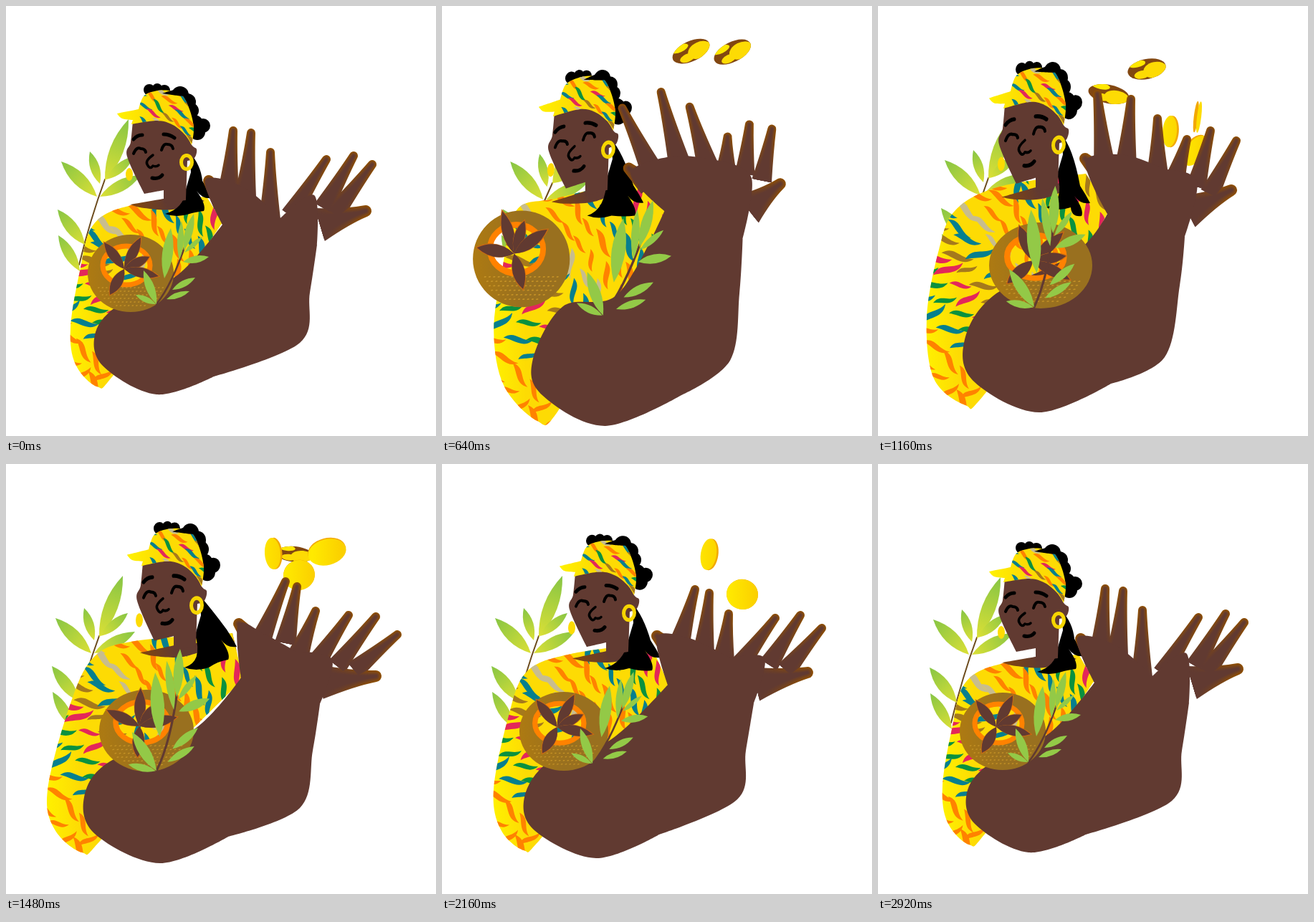
Animation of 600 by 600 pixels, one loop 3000 ms. Source, as an HTML page with a canvas:

```html
<!DOCTYPE html>
<html>
<head>
<meta charset="utf-8">
<style>
html, body { margin: 0; width: 100%; height: 100%; overflow: hidden; background: #fff }
canvas { display: block; width: 600px; height: 600px }
</style>
</head>
<body>
<canvas id="stage" width="600" height="600"></canvas>
<script>
const ctx = document.getElementById('stage').getContext('2d');
const SKIN = '#613a31', GOLD = '#fddb04', GREEN = '#93c947', OCHRE = '#99701f', ORANGE = '#ff8200';
const DYES = ['#067f8e', ORANGE, '#e3275a', '#c8bd8e', '#067f8e', '#a5791c', ORANGE, '#0a913f'];
const TIMES = [0, 400, 880, 1160, 1480, 2160, 2920];

// Poses at TIMES; the last pose repeats the first.
const head = [ // nose x, y, vertical shear, vertical scale
  [203, 222, 0, 1], [186, 216, -.1, 1.04], [185, 206, -.14, 1.08],
  [203, 203, -.1, 1.1], [217, 203, -.03, 1.08], [212, 214, -.04, 1.02]];
const tail = [ // left tip, right tip of the hair
  [222, 290, 288, 268], [207, 296, 292, 280], [205, 287, 273, 268],
  [235, 281, 296, 275], [249, 284, 322, 255], [227, 285, 305, 270]];
const backTwig = [ // x, y, turn
  [130, 266, 0], [135, 275, .1], [152, 264, .04], [146, 264, 0], [122, 264, 0], [127, 264, 0]];
const frontTwig = [ // x, y, turn, scale
  [210, 416, 0, 1], [222, 433, .04, 1.24], [225, 427, -.04, 1.29],
  [218, 420, -.22, 1.26], [210, 428, -.2, 1.27], [210, 418, .03, 1.03]];
const dress = [
  [175, 278, 280, 266, 302, 302, 250, 380, 150, 515, 127, 531, 97, 500, 90, 450, 103, 370, 122, 305],
  [165, 275, 264, 249, 312, 295, 240, 440, 160, 560, 131, 573, 88, 525, 74, 460, 88, 390, 112, 290],
  [160, 260, 270, 238, 312, 280, 250, 400, 158, 565, 132, 576, 85, 530, 72, 445, 82, 345, 98, 283],
  [170, 252, 290, 234, 323, 284, 260, 400, 146, 545, 122, 557, 78, 520, 68, 435, 85, 340, 108, 285],
  [180, 247, 316, 236, 331, 300, 255, 375, 132, 525, 106, 542, 68, 510, 58, 455, 88, 340, 122, 270],
  [180, 265, 290, 250, 317, 308, 240, 400, 136, 525, 114, 539, 82, 510, 72, 455, 92, 355, 118, 290]];
const hands = [ // palm edge from left to right, then down the forearm
  [278, 243, 330, 252, 383, 296, 430, 264, 434, 333, 424, 400, 410, 470],
  [270, 240, 330, 214, 385, 230, 435, 250, 421, 332, 416, 400, 405, 490],
  [262, 225, 320, 210, 385, 212, 430, 232, 421, 318, 416, 400, 400, 495],
  [290, 217, 345, 208, 400, 228, 445, 244, 428, 322, 421, 390, 400, 490],
  [324, 224, 362, 238, 405, 262, 455, 273, 438, 335, 428, 400, 410, 480],
  [300, 242, 345, 243, 403, 271, 450, 271, 435, 334, 424, 400, 412, 468]];
const elbow = [ // below the forearm and round to the left wrist
  [290, 517, 210, 542, 135, 502, 125, 455, 160, 415, 240, 375, 302, 305],
  [330, 542, 225, 582, 140, 540, 125, 490, 170, 413, 240, 414, 311, 290],
  [335, 537, 228, 582, 140, 540, 127, 490, 165, 423, 255, 378, 310, 285],
  [325, 527, 225, 567, 135, 525, 120, 470, 160, 405, 275, 345, 320, 290],
  [310, 520, 215, 557, 125, 517, 109, 465, 145, 415, 260, 372, 328, 298],
  [303, 517, 215, 550, 130, 512, 115, 465, 150, 415, 235, 385, 315, 308]];
const tips = [
  [283, 244, 317, 174, 342, 177, 369, 204, 447, 214, 485, 209, 511, 221, 502, 286],
  [267, 231, 277, 143, 315, 135, 355, 156, 415, 190, 447, 178, 474, 188, 481, 264],
  [261, 222, 241, 143, 307, 113, 345, 135, 392, 179, 422, 159, 458, 163, 469, 238],
  [289, 213, 306, 123, 353, 130, 390, 157, 431, 186, 464, 174, 500, 188, 493, 257],
  [325, 223, 390, 164, 406, 171, 432, 205, 478, 211, 516, 213, 546, 238, 516, 296],
  [300, 240, 353, 175, 373, 180, 400, 209, 465, 215, 500, 211, 530, 229, 510, 291]];
const roots = [
  [303, 275, 310, 262, 334, 264, 368, 297, 397, 292, 443, 282, 458, 290, 438, 305],
  [292, 255, 300, 230, 340, 222, 373, 236, 402, 242, 432, 248, 453, 257, 430, 294],
  [290, 248, 286, 222, 323, 216, 370, 218, 393, 224, 418, 230, 443, 238, 426, 276],
  [316, 240, 316, 222, 346, 222, 390, 234, 415, 240, 444, 252, 463, 262, 432, 287],
  [347, 250, 354, 250, 390, 250, 408, 266, 434, 276, 462, 282, 486, 288, 440, 304],
  [322, 262, 331, 252, 365, 262, 393, 272, 416, 280, 456, 280, 480, 288, 438, 307]];
const bowl = { // centre, radii, turn
  times: [0, 400, 560, 880, 1160, 1480, 2160, 2920],
  rows: [[174, 373, 60, 54, 0], [97, 352, 62, 68, -.5], [84, 349, 65, 68, -.7], [210, 367, 75, 65, -.85],
    [227, 362, 72, 60, .3], [196, 372, 66, 57, -.45], [170, 373, 62, 55, 0], [174, 373, 60, 54, 0]]
};
// Tossed pieces: time, x, y, long radius, short radius, turn
const nuts = [
  [[280, 440, 230, 27, 14, .6], [400, 404, 117, 29, 13, .1], [620, 352, 62, 28, 14, -.4], [880, 297, 133, 26, 15, -.8], [1000, 290, 240, 26, 15, -1]],
  [[280, 440, 270, 26, 13, -1.2], [400, 431, 176, 28, 13, -.85], [680, 400, 54, 28, 14, -.4], [880, 366, 77, 30, 14, -.1], [1160, 322, 123, 29, 13, .2], [1300, 335, 250, 26, 13, .5]],
  [[720, 420, 240, 26, 14, -1.3], [880, 405, 109, 28, 16, -.85], [1160, 375, 88, 27, 14, -.2], [1480, 403, 126, 26, 11, .1], [1640, 380, 260, 24, 12, .6]]];
const coins = [
  [[1040, 410, 250, 22, 12, 1.5], [1160, 407, 175, 22, 10, 1.65], [1320, 390, 104, 22, 16, 1.6], [1480, 372, 125, 22, 11, 1.5], [1660, 365, 260, 22, 14, 1.2]],
  [[1060, 440, 270, 24, 10, -.9], [1160, 443, 202, 24, 13, -.95], [1320, 430, 120, 23, 18, -.6], [1480, 409, 155, 22, 21, -.3], [1620, 395, 270, 22, 18, 0]],
  [[1060, 450, 260, 22, 3, -1.5], [1160, 448, 155, 22, 3, -1.45], [1320, 455, 92, 24, 10, -.8], [1480, 448, 123, 27, 18, -.25], [1680, 415, 270, 22, 20, 0]],
  [[1900, 405, 270, 22, 18, 1.2], [2160, 372, 126, 22, 11, 1.72], [2400, 345, 260, 22, 18, 2]],
  [[2020, 430, 280, 22, 12, .2], [2160, 419, 182, 22, 21, .2], [2300, 400, 132, 22, 16, .5], [2520, 365, 280, 22, 10, 1]]];

function sample(times, rows, t) {
  const last = times.length - 1;
  let i = 0;
  while (i < last - 1 && t >= times[i + 1]) i++;
  const h = times[i + 1] - times[i], u = (t - times[i]) / h, v = 1 - u;
  const slope = (j, k) => j > 0 && j < last
    ? (rows[j + 1][k] - rows[j - 1][k]) / (times[j + 1] - times[j - 1]) : 0;
  return rows[i].map((a, k) => v * v * (1 + 2 * u) * a + u * u * (3 - 2 * u) * rows[i + 1][k]
    + h * u * v * (v * slope(i, k) - u * slope(i + 1, k)));
}
const pose = (rows, t) => sample(TIMES, [...rows, rows[0]], t);

function shape(p, corners = []) {
  const n = p.length / 2, at = i => [p[(i + n) % n * 2], p[(i + n) % n * 2 + 1]];
  const pull = i => {
    if (corners.includes(i % n)) return [0, 0];
    const a = at(i - 1), b = at(i + 1);
    return [(b[0] - a[0]) / 6, (b[1] - a[1]) / 6];
  };
  ctx.beginPath();
  ctx.moveTo(...at(0));
  for (let i = 0; i < n; i++) {
    const a = at(i), b = at(i + 1), c = pull(i), d = pull(i + 1);
    ctx.bezierCurveTo(a[0] + c[0], a[1] + c[1], b[0] - d[0], b[1] - d[1], ...b);
  }
  ctx.closePath();
}
function fill(color) { ctx.fillStyle = color; ctx.fill(); }
function oval(x, y, rx, ry, color, turn = 0) {
  ctx.beginPath();
  ctx.ellipse(x, y, rx, ry, turn, 0, 7);
  fill(color);
}
function group(x, y, turn, scale, draw) {
  ctx.save();
  ctx.translate(x, y);
  ctx.rotate(turn);
  ctx.scale(scale, scale);
  draw();
  ctx.restore();
}
function line(d, width, color = '#000') {
  ctx.lineWidth = width;
  ctx.lineCap = ctx.lineJoin = 'round';
  ctx.strokeStyle = color;
  ctx.stroke(new Path2D(d));
}
function blend(x0, y0, x1, y1, from, to) {
  const g = ctx.createLinearGradient(x0, y0, x1, y1);
  g.addColorStop(0, from);
  g.addColorStop(1, to);
  return g;
}
function leaf(x0, y0, x1, y1, w, color) {
  const l = Math.hypot(x1 - x0, y1 - y0), nx = (y0 - y1) / l * w, ny = (x1 - x0) / l * w;
  const mx = (x0 + x1) / 2, my = (y0 + y1) / 2;
  ctx.beginPath();
  ctx.moveTo(x0, y0);
  ctx.quadraticCurveTo(mx + nx, my + ny, x1, y1);
  ctx.quadraticCurveTo(mx - nx, my - ny, x0, y0);
  fill(color);
}

const flame = new Path2D('M-21 2C-8-13 3 1 21-5C10 10-4 1-21 2Z');
function flames(x0, y0, x1, y1, step, size, place) {
  let seed = 7, n = 0;
  const rnd = () => (seed = seed * 16807 % 2147483647) / 2147483647;
  for (let y = y0, row = 0; y < y1; y += step * .53, row++)
    for (let x = x0 + row % 2 * step / 2; x < x1; x += step) {
      const px = x + rnd() * 8 - 4, py = y + rnd() * 6 - 3, a = rnd(), s = size * (.75 + rnd() * .4);
      const color = DYES[(n++ * 3 + row * 2) % DYES.length];
      group(...place(px, py, a), s, () => { ctx.fillStyle = color; ctx.fill(flame); });
    }
}

function drawBackTwig([x, y, turn]) {
  group(x, y, turn, 1, () => {
    line('M8-24Q-12 30-28 95', 2, '#6b4a1c');
    for (const [a, b, c, d, w] of [[8, -22, 41, -108, 19], [-3, 0, -53, -49, 18], [1, -18, -13, -63, 13],
      [1, 0, 58, -30, 16], [10, -24, 48, -56, 13], [-20, 67, -58, 18, 17], [-27, 104, -57, 54, 15]])
      leaf(a, b, c, d, w, blend(a, b, c, d, '#dce035', '#86c545'));
  });
}
function drawFrontTwig([x, y, turn, scale]) {
  group(x, y, turn, scale, () => {
    line('M0 0Q22-28 41-85', 2.5, SKIN);
    for (const l of [[0, 0, -18, -47, 12], [-1, 0, -29, -13, 8], [11, -36, 20, -106, 15], [38, -75, 52, -126, 11],
      [32, -62, 35, -116, 9], [37, -59, 73, -66, 10], [39, -72, 64, -94, 7], [22, -20, 54, -37, 9], [14, -7, 46, -18, 8]])
      leaf(...l, GREEN);
  });
}

function drawDress(p) {
  ctx.save();
  shape(p, [1, 2, 3]);
  fill(blend(p[14], 0, p[14] + 45, 0, '#fff000', GOLD));
  ctx.clip();
  const base = dress[0], shift = (i, v) => (p[18 + i] - base[18 + i]) * (1 - v) + (p[10 + i] - base[10 + i]) * v;
  flames(40, 235, 345, 560, 33, .95, (x, y, a) => {
    const v = Math.min(1, Math.max(0, (y - 290) / 240));
    return [x + shift(0, v), y + shift(1, v), x > 190 ? 1.1 + a * .7 : y < 350 ? .3 + a * .6 : y > 460 ? a * 2 - .6 : a * .9 - .5];
  });
  ctx.restore();
}

function drawHead([x, y, shear, sy], [lx, ly, rx, ry]) {
  const inHead = draw => {
    ctx.save();
    ctx.transform(1, shear, 0, sy, x, y);
    draw();
    ctx.restore();
  };
  inHead(() => {
    shape([-30, 55, 17, 47, 60, 44, 74, 50, 30, 62, -10, 60], [0, 1, 2, 3]);
    fill(blend(-25, 60, 20, 48, '#82460f', SKIN));
    oval(-31, 13, 5, 9, GOLD);
  });
  // Two locks with a thin gap near the neck.
  const ex = x + 57, ey = y + shear * 57 - 18;
  ctx.beginPath();
  ctx.moveTo(ex - 4, ey);
  ctx.quadraticCurveTo(ex + 12, ey + 18, rx - 14, ry - 24);
  ctx.quadraticCurveTo(rx - 6, ry - 12, rx, ry);
  ctx.quadraticCurveTo(rx - 14, ry + 2, rx - 22, ry - 10);
  ctx.quadraticCurveTo(rx - 8, ry + 10, rx - 12, ry + 18);
  ctx.quadraticCurveTo(rx - 26, ry + 20, lx + 34, ly);
  ctx.quadraticCurveTo(lx + 16, ly + 6, lx, ly);
  ctx.quadraticCurveTo(lx + 26, ly - 8, ex - 10, ey + 55);
  ctx.lineTo(ex - 2, ey + 28);
  fill('#000');
  inHead(() => {
    for (const [a, b, r] of [[-3, -105, 8], [8, -107, 7], [18, -104, 8], [40, -98, 12], [50, -88, 12], [55, -76, 11],
      [60, -58, 12], [72, -55, 10], [64, -46, 11]]) oval(a, b, r, r, '#000');
    shape([-26, -62, -29, -32, -34, -12, -10, 40, 17, 35, 17, 53, 48, 49, 50, -6, 60, -10, 63, -22, 55, -30, 40, -66],
      [0, 3, 4, 5, 6, 7]);
    fill(SKIN);
    // Headwrap with its knot on the left.
    ctx.save();
    shape([-48, -72, -18, -78, -11, -96, 4, -103, 24, -104, 42, -98, 53, -78, 59, -52, 56, -28, 47, -42, 30, -56, 8, -62,
      -28, -57, -26, -63, -41, -65], [0, 1, 8, 12, 13]);
    fill(blend(-45, 0, 0, 0, '#fff000', GOLD));
    ctx.clip();
    flames(-12, -104, 66, -24, 22, .62, (a, b, r) => [a, b, .5 + r * .6]);
    ctx.restore();
    shape([15, -100, 35, -105, 48, -96, 36, -97], [0, 2]);
    fill('#000');
    line('M-25-36Q-20-42-13-42M17-43Q25-43 32-38', 5);
    line('M-25-16Q-21-26-15-23Q-9-23-8-18M14-21Q17-31 22-29Q29-29 30-23', 4);
    line('M2-14Q-9-6-6-1Q-2 7 2 1Q7 3 10 0', 3.5);
    line('M1 18Q10 20 15 14', 5);
    ctx.beginPath();
    ctx.ellipse(49, -4, 7.5, 9.5, 0, 0, 7);
    ctx.lineWidth = 5;
    ctx.strokeStyle = '#f6d600';
    ctx.stroke();
  });
}

function drawTossed(rows, t, isNut) {
  const times = rows.map(r => r[0]);
  if (t < times[0] || t > times[times.length - 1]) return;
  const [, x, y, rx, ry, turn] = sample(times, rows, t);
  if (isNut) {
    group(x, y, turn, 1, () => {
      oval(0, 0, rx, ry, '#824711');
      ctx.clip();
      oval(rx * .42, ry * .25, rx * .62, ry * .8, GOLD);
      oval(-rx * .3, ry * .45, rx * .4, ry * .4, GOLD);
      oval(-rx * .45, -ry * .7, rx * .45, ry * .35, '#ffe800');
    });
  } else {
    const rim = 5 * (1 - ry / rx);
    oval(x + rim * Math.sin(turn), y - rim * Math.cos(turn), rx, ry, '#f2a800', turn);
    oval(x, y, rx, ry, blend(x - 20, y, x + 20, y, '#ffea00', '#fbd000'), turn);
  }
}

function drawArm(palm, bend, ends, starts) {
  const edge = [142, 78, 4], core = [97, 58, 49], layers = 6;
  for (let k = 0; k < layers; k++) {
    const f = k / (layers - 1), color = `rgb(${edge.map((c, i) => c + (core[i] - c) * f)})`;
    for (let i = 0; i < 16; i += 2) {
      const thumb = i == 0 || i == 14, wide = (i == 14 ? 24 : i > 6 && i < 14 ? 14 : 15) * (1 - f * .35);
      const r = (thumb ? 8 : 6) * (1 - f * .75);
      const [x, y, bx, by] = [ends[i], ends[i + 1], starts[i], starts[i + 1]];
      const a = Math.atan2(y - by, x - bx), nx = -Math.sin(a), ny = Math.cos(a);
      const mx = (x * .6 + bx * .4), my = (y * .6 + by * .4), m = r * 1.35;
      ctx.beginPath();
      ctx.moveTo(bx + nx * wide, by + ny * wide);
      ctx.quadraticCurveTo(mx + nx * m, my + ny * m, x + nx * r, y + ny * r);
      ctx.arc(x, y, r, a + Math.PI / 2, a - Math.PI / 2, true);
      ctx.quadraticCurveTo(mx - nx * m, my - ny * m, bx - nx * wide, by - ny * wide);
      fill(blend(x, y, bx, by, color, SKIN));
    }
  }
  shape([...palm, ...bend], [2, 4, 7, 13]);
  fill(SKIN);
}

function drawBowl([x, y, rx, ry, turn]) {
  group(x, y, 0, 1, () => {
    ctx.scale(rx / 60, ry / 54);
    ctx.beginPath();
    ctx.ellipse(0, 0, 60, 54, 0, 0, 7);
    ctx.ellipse(-6, -11, 32, 26, 0, 0, 7);
    ctx.fillStyle = blend(-60, 0, 0, 0, '#ad7a12', OCHRE);
    ctx.fill('evenodd');
    ctx.beginPath();
    ctx.ellipse(-6, -11, 33, 27, 0, 0, 7);
    ctx.lineWidth = 7;
    ctx.strokeStyle = ORANGE;
    ctx.stroke();
    for (let j = 0; j < 6; j++)
      for (let i = -8; i <= 8; i++) {
        const px = i * 5.6 + j % 2 * 2.8, py = 20 + j * 5;
        if (Math.hypot(px / 55, py / 49) < 1) oval(px, py, 1.5, .7, '#c79427', -.2);
      }
    ctx.translate(-9, -6);
    ctx.rotate(turn);
    for (const [tx, ty, w] of [[-28, -37, 13], [23, -44, 13], [35, -17, 12], [48, 10, 13], [-20, 36, 14]]) {
      leaf(0, 0, tx * 1.05, ty * 1.05, w + 2, '#c96a12');
      leaf(0, 0, tx, ty, w + 1, SKIN);
    }
  });
}

function draw(t) {
  ctx.fillStyle = '#fff';
  ctx.fillRect(0, 0, 600, 600);
  drawBackTwig(pose(backTwig, t));
  drawDress(pose(dress, t));
  drawHead(pose(head, t), pose(tail, t));
  nuts.forEach(n => drawTossed(n, t, true));
  coins.forEach(c => drawTossed(c, t, false));
  drawArm(pose(hands, t), pose(elbow, t), pose(tips, t), pose(roots, t));
  drawBowl(sample(bowl.times, bowl.rows, t));
  drawFrontTwig(pose(frontTwig, t));
}

const start = performance.now();
function tick() {
  const t = (performance.now() - start) % 3000;
  draw(Math.min(Math.floor(t / 40) * 40, 2920));
  requestAnimationFrame(tick);
}
tick();
</script>
</body>
</html>
```
